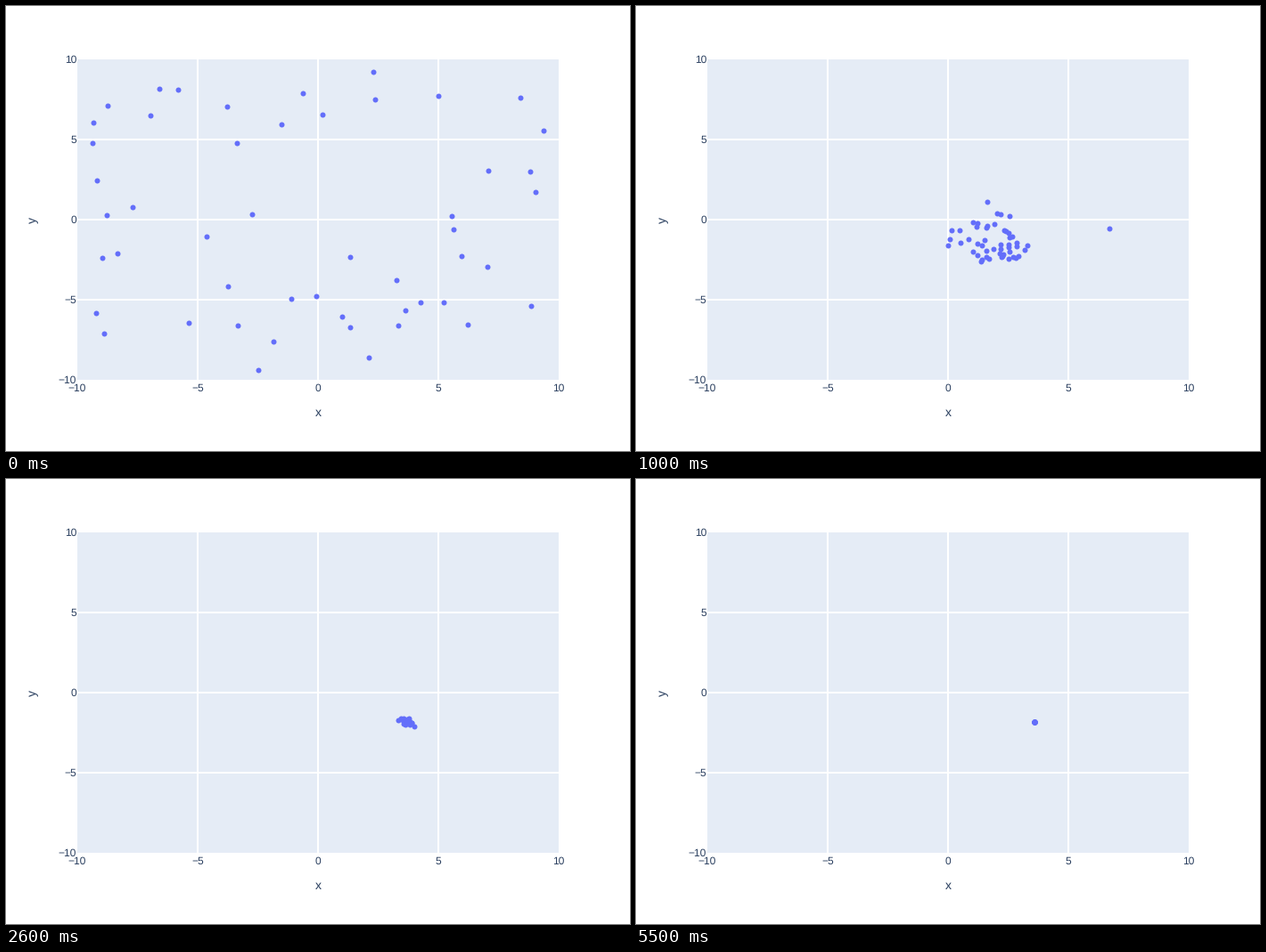
A matplotlib script for the animation above (5.6 s loop, 700 px wide and 500 px high).

```python
import numpy as np
import matplotlib.pyplot as plt
from matplotlib.animation import FuncAnimation
from matplotlib.patches import Rectangle

W, H, DPI = 700, 500, 100
FRAMES, STEP_MS = 56, 100
INK, PANEL, DOT = "#2a3f5f", "#e5ecf6", "#636efa"
COUNT, REACH, GAP = 50, 9.45, 0.7

plt.rcParams.update({"font.family": "Liberation Sans", "text.hinting": "none"})
rng = np.random.default_rng(7)

# Swarm state at key steps: where it gathers and how wide it still is.
STEP = [0, 4, 10, 18, 24, 34, 48, 55]
CENTER_X = [0.56, 0.56, 2.1, 3.55, 3.7, 3.54, 3.56, 3.58]
CENTER_Y = [-1.1, -1.1, -1.5, -1.7, -1.8, -1.8, -1.82, -1.83]
SPREAD = [1, 0.7, 0.2, 0.13, 0.036, 0.0085, 0.0035, 0.0005]


def scatter():
    """Random start over the plot, thin around the middle."""
    points = []
    while len(points) < COUNT:
        x, y = p = rng.uniform(-REACH, REACH, 2)
        in_void = ((x - 1) / 4.5) ** 2 + ((y - 2.2) / 3) ** 2 < 1
        if not in_void and all(np.hypot(*(p - q)) > GAP for q in points):
            points.append(p)
    return np.array(points)


start = scatter()
offset = start - [CENTER_X[0], CENTER_Y[0]]
radius = np.hypot(*offset.T)
angle = np.arctan2(offset[:, 1], offset[:, 0])
pull = rng.uniform(0.85, 1.6, COUNT)
turn = rng.normal(0, 1.2, COUNT)
# Everyone starts exactly in place; pull only matters once spread < 1.
stray = start[:, 0].argmax()


def swarm(t):
    spread = np.exp(np.interp(t, STEP, np.log(SPREAD)))
    r = radius * spread ** pull
    a = angle + turn * (t / 18) ** 2
    x = np.interp(t, STEP, CENTER_X) + r * np.cos(a)
    y = np.interp(t, STEP, CENTER_Y) + r * np.sin(a)
    # One particle shoots past the others before it turns back.
    x[stray] += 4.6 * (np.exp(-((t - 13.5) / 5) ** 2) if t else 0)
    return 350 + 27 * x, 240 - 18 * y


fig = plt.figure(figsize=(W / DPI, H / DPI), dpi=DPI, facecolor="white")
ax = fig.add_axes([0, 0, 1, 1])
ax.set_xlim(0, W)
ax.set_ylim(H, 0)
ax.axis("off")


def box(x, y, w, h, color):
    ax.add_patch(Rectangle((x, y), w, h, color=color, lw=0))


def label(x, y, text, px=12, **kw):
    ax.text(x, y, text, size=px * 72 / DPI, color=INK, va="baseline", **kw)


box(80, 60, 540, 360, PANEL)
for v in (-5, 0, 5):
    box(349 + 27 * v, 60, 2, 360, "white")
    box(80, 239 - 18 * v, 540, 2, "white")
for v in range(-10, 11, 5):
    text = str(v).replace("-", "\u2212")
    label(350 + 27 * v, 433.3, text, ha="center")
    label(79, 244.2 - 18 * v, text, ha="right")
label(350, 461, "x", 14, ha="center")
label(34, 240, "y", 14, ha="center", rotation=90, rotation_mode="anchor")

dots, = ax.plot([], [], "o", ms=6 * 72 / DPI, mew=0, color=DOT, snap=False)


def draw(i):
    dots.set_data(*swarm(i))
    return dots,


anim = FuncAnimation(fig, draw, frames=FRAMES, init_func=lambda: draw(0),
                     interval=STEP_MS, repeat=True, repeat_delay=0)
plt.show()
```
